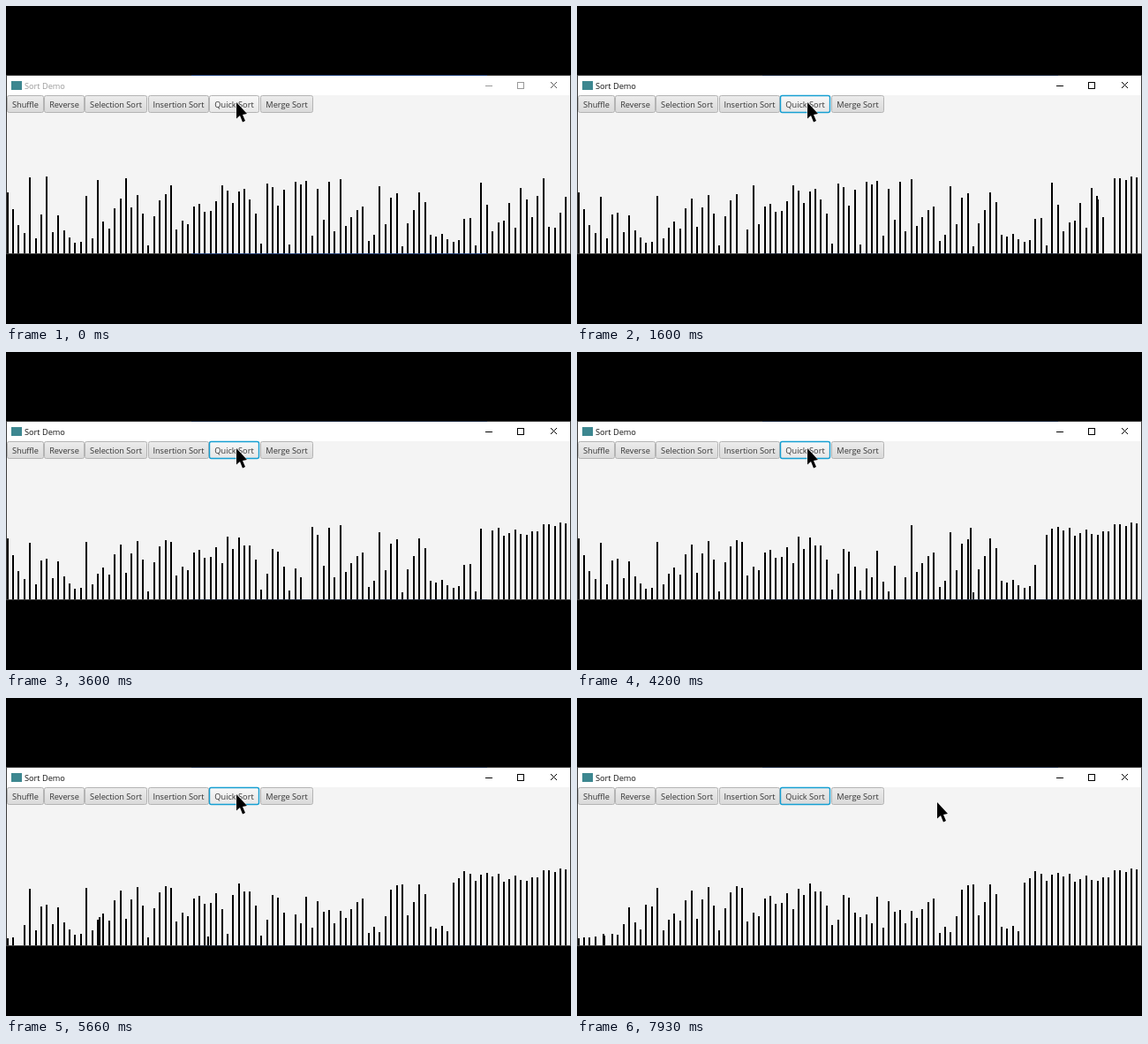
An HTML page with a canvas that plays this animation: 640x360 px, repeating every 8000 ms.

```html
<!DOCTYPE html>
<html lang="en">
<head>
<meta charset="utf-8">
<title>Sort Demo</title>
<style>
  html, body { margin: 0; width: 100%; height: 100%; overflow: hidden; background: #000; }
  canvas { display: block; width: 640px; height: 360px; }
</style>
</head>
<body>
<canvas id="stage" width="640" height="360"></canvas>
<script>
const ctx = document.getElementById('stage').getContext('2d');
const LOOP = 8000, SWAP = 250, FIRST = 576, FONT = '9.2px "Open Sans", "Noto Sans", sans-serif';
const ACTIVE = 60, RELEASE = 400;

// Bar positions listed from the shortest bar to the tallest.
const byHeight = [
  70, 25, 83, 50, 45, 12, 13, 79, 64, 80, 78, 5, 15, 11, 76, 54, 65, 75, 77, 3,
  8, 58, 86, 10, 30, 18, 97, 90, 96, 60, 2, 67, 32, 71, 87, 17, 31, 88, 56, 81,
  82, 93, 61, 26, 9, 6, 44, 24, 98, 35, 36, 72, 62, 1, 19, 22, 33, 63, 48, 85,
  34, 40, 89, 74, 37, 27, 43, 92, 20, 68, 99, 94, 14, 23, 28, 69, 0, 73, 41, 39,
  49, 55, 42, 91, 47, 66, 38, 29, 52, 46, 84, 51, 57, 53, 16, 59, 21, 95, 4, 7
];
const start = [];
byHeight.forEach((slot, rank) => { start[slot] = rank; });

const swaps = [];
function exchange(a, i, j) {
  [a[i], a[j]] = [a[j], a[i]];
}
function quickSort(a, lo, hi) {
  if (lo >= hi) return;
  const pivot = a[(lo + hi) >> 1];
  let i = lo, j = hi;
  while (i <= j) {
    while (a[i] < pivot) i++;
    while (a[j] > pivot) j--;
    if (i > j) break;
    if (i < j) {
      swaps.push([i, j]);
      exchange(a, i, j);
    }
    i++;
    j--;
  }
  quickSort(a, lo, j);
  quickSort(a, i, hi);
}
quickSort(start.slice(), 0, 99);

// Linear motion with short acceleration and braking phases.
function easeBoth(p) {
  if (p < 0.2) return 3.125 * p * p;
  if (p > 0.8) return 1 - 3.125 * (1 - p) * (1 - p);
  return 1.25 * p - 0.125;
}

const clamp = v => Math.min(1, Math.max(0, v));

function rect(x, y, w, h, fill) {
  ctx.fillStyle = fill;
  ctx.fillRect(x, y, w, h);
}

function text(s, x, y, fill) {
  ctx.font = FONT;
  ctx.fillStyle = fill;
  ctx.fillText(s, x, y);
}

function drawBar(slot, rank) {
  const top = Math.round(272.2 - 0.8 * rank);
  rect(Math.round(0.7 + 6.39 * slot), top, 2, 280 - top, '#000');
}

function drawBars(t) {
  // The first exchange gets going slowly.
  const late = (t - FIRST) / SWAP;
  const n = late >= 1 ? late : clamp((t - 430) / (FIRST + SWAP - 430));
  const done = Math.floor(n);
  const bars = start.slice();
  for (let k = 0; k < done; k++) exchange(bars, ...swaps[k]);
  const [a, b] = swaps[done];
  const shift = (b - a) * easeBoth(n - done);
  bars.forEach((rank, i) => {
    drawBar(i === a ? a + shift : i === b ? b - shift : i, rank);
  });
}

function drawWindow(active) {
  rect(0, 0, 640, 360, '#000');
  rect(0, 78, 640, 203, '#3c3c3c');
  rect(210, 78, 335, 1, active ? '#1c2940' : '#23437a');
  rect(210, 280, 335, 1, active ? '#202838' : '#23437a');
  rect(1, 79, 638, 22, '#fff');
  rect(1, 101, 638, 179, '#f4f4f4');

  const ink = active ? '#000' : '#999';
  rect(6, 85, 12, 10, '#3d8790');
  text('Sort Demo', 21, 94, active ? '#111' : '#999');
  rect(543, 90, 8, 1, ink);
  ctx.lineWidth = 1;
  ctx.strokeStyle = ink;
  ctx.strokeRect(579.5, 86.5, 7, 7);
  ctx.strokeStyle = active ? '#000' : '#555';
  ctx.beginPath();
  ctx.moveTo(617, 86);
  ctx.lineTo(624, 93);
  ctx.moveTo(624, 86);
  ctx.lineTo(617, 93);
  ctx.stroke();
}

const buttons = [
  ['Shuffle', 1, 43], ['Reverse', 43, 89], ['Selection Sort', 89, 160],
  ['Insertion Sort', 161, 230], ['Quick Sort', 230, 287], ['Merge Sort', 288, 348]
];

function drawButton([label, x, right], state) {
  const w = right - x;
  const fill = ctx.createLinearGradient(0, 102, 0, 121);
  const [light, dark] = state.pressed ? ['#d2d2d2', '#c6c6c6']
    : state.hover ? ['#f8f8f8', '#e6e6e6'] : ['#ececec', '#d9d9d9'];
  fill.addColorStop(0, light);
  fill.addColorStop(1, dark);
  ctx.beginPath();
  ctx.roundRect(x + 0.5, 101.5, w - 1, 19, 2);
  ctx.fillStyle = fill;
  ctx.fill();
  ctx.lineWidth = state.focus ? 1.4 : 1;
  ctx.strokeStyle = state.focus ? '#169fd2' : '#b4b4b4';
  ctx.stroke();
  ctx.textAlign = 'center';
  text(label, x + w / 2, 115, '#333');
  ctx.textAlign = 'left';
}

function pointerAt(t) {
  const p = clamp((t - 7180) / 750);
  const e = p * p * (3 - 2 * p);
  return [261 + 147 * e, 109 + 9 * e - 9 * Math.sin(Math.PI * e)];
}

function drawPointer([x, y]) {
  ctx.save();
  ctx.translate(x, y);
  ctx.beginPath();
  [[0, 0], [0, 18.5], [4, 15], [7, 22.5], [10, 21], [7, 14], [12, 13]]
    .forEach(([px, py]) => ctx.lineTo(px, py));
  ctx.closePath();
  ctx.lineWidth = 1;
  ctx.strokeStyle = '#fff';
  ctx.stroke();
  ctx.fillStyle = '#000';
  ctx.fill();
  ctx.restore();
}

function draw(t) {
  const active = t >= ACTIVE;
  const pointer = pointerAt(t);
  drawWindow(active);
  drawBars(t);
  buttons.forEach(b => {
    const quick = b[0] === 'Quick Sort';
    drawButton(b, {
      focus: quick && active,
      pressed: quick && active && t < RELEASE,
      hover: pointer[0] >= b[1] && pointer[0] < b[2] && pointer[1] < 121
    });
  });
  drawPointer(pointer);
}

const origin = performance.now();
function tick() {
  draw((performance.now() - origin) % LOOP);
  requestAnimationFrame(tick);
}
tick();
</script>
</body>
</html>
```
